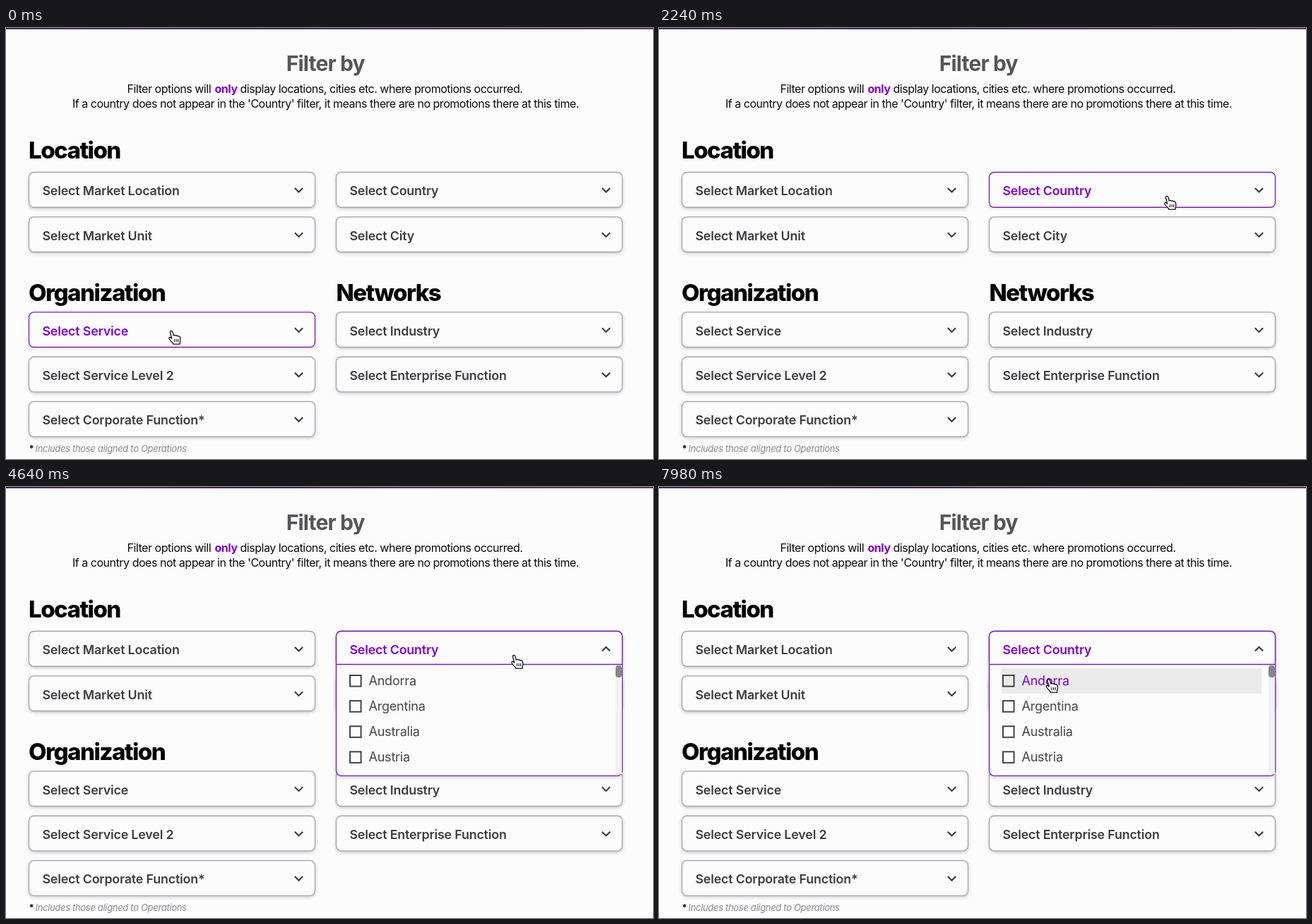
An HTML page with a canvas that plays this animation: 916x611 px, repeating every 8000 ms.

```html
<!DOCTYPE html>
<html lang="en">
<head>
<meta charset="utf-8">
<title>Filter by</title>
<style>
  html, body { margin: 0; width: 100%; height: 100%; overflow: hidden; background: #fcfcfc; }
  canvas { display: block; width: 916px; height: 611px; }
</style>
</head>
<body>
<canvas id="stage" width="916" height="611"></canvas>
<script>
const ctx = document.getElementById('stage').getContext('2d');
const LOOP = 8000;
const OPEN_AT = 3740;
const FLIP_AT = 3800;
const ROW_HOVER_AT = 5365;
const FADE = 300;
const BOX_W = 405, BOX_H = 49.7;

const BG = [252, 252, 252];
const INK = [62, 60, 66];
const PURPLE = [128, 0, 208];
const EDGE = [166, 163, 176];
const EDGE_ON = [130, 26, 182];

const FONTS = {
  title: { font: '700 30px Inter, sans-serif', gap: -0.85 },
  heading: { font: '800 33px Inter, sans-serif', gap: -1.5 },
  body: { font: '400 16px Inter, sans-serif', gap: -0.475 },
  strong: { font: '700 16px Inter, sans-serif', gap: -0.45 },
  label: { font: '600 17.8px Inter, sans-serif', gap: -0.15 },
  option: { font: '400 18px Inter, sans-serif', gap: -0.22 },
  note: { font: 'italic 400 13px Inter, sans-serif', gap: -0.32 },
  star: { font: '700 13px Inter, sans-serif', gap: 0 }
};

// on/off: time span in which the pointer hovers over the box
const BOXES = [
  { x: 32.5, y: 204.5, label: 'Select Market Location' },
  { x: 32.5, y: 267.8, label: 'Select Market Unit' },
  { x: 467.5, y: 267.8, label: 'Select City', on: 1577, off: 1807 },
  { x: 32.5, y: 402.8, label: 'Select Service', on: -1000, off: 1168 },
  { x: 32.5, y: 466.2, label: 'Select Service Level 2' },
  { x: 32.5, y: 529.6, label: 'Select Corporate Function*' },
  { x: 467.5, y: 402.8, label: 'Select Industry' },
  { x: 467.5, y: 466.2, label: 'Select Enterprise Function' },
  { x: 467.5, y: 204.5, label: 'Select Country', on: 1897, off: Infinity, opens: true }
];
const OPTIONS = ['Andorra', 'Argentina', 'Australia', 'Austria'];

const easeIn = u => Math.pow(u, 1.5);
const easeOut = u => 1 - (1 - u) * (1 - u);
const PATH = [
  { t: 900, x: 235.5, y: 430 },
  { t: 1660, x: 690, y: 297, ease: easeIn },
  { t: 2150, x: 720.5, y: 239, ease: easeOut },
  { t: 5100, x: 720.5, y: 239, ease: easeOut },
  { t: 5440, x: 618.5, y: 265, ease: easeIn },
  { t: 5900, x: 553, y: 273, ease: easeOut }
];

const HAND = new Path2D('M-3 2Q-3.5-.8-1-.5Q.3-.2 .8 2L1.8 6Q4 4.6 5 6.4Q7 5.2 8 7.2' +
  'Q10.8 6.2 11 9Q12 13 10.6 15.5V18.2H1.2L.8 16.8Q-1.5 15-4.2 11Q-5.4 8.4-3.2 8.4Q-2.2 8.6-.8 10Z');
const KNUCKLES = new Path2D('M3 11V15M5.6 11V15M8.2 11V15');

const clamp = v => Math.max(0, Math.min(1, v));
const rgb = c => `rgb(${c.map(Math.round).join(',')})`;
const mix = (a, b, k) => rgb(a.map((v, i) => v + (b[i] - v) * k));

function text(str, x, y, style, color, align = 'left') {
  ctx.font = FONTS[style].font;
  ctx.letterSpacing = FONTS[style].gap + 'px';
  ctx.textAlign = align;
  ctx.fillStyle = color;
  ctx.fillText(str, x, y);
}

function panel(x, y, w, h, edge, depth) {
  ctx.beginPath();
  ctx.roundRect(x, y, w, h, 7);
  ctx.save();
  ctx.shadowColor = `rgba(60,55,80,${depth})`;
  ctx.shadowBlur = 5;
  ctx.shadowOffsetY = 2;
  ctx.fillStyle = rgb(BG);
  ctx.fill();
  ctx.restore();
  ctx.strokeStyle = edge;
  ctx.lineWidth = 1.35;
  ctx.stroke();
}

function chevron(x, y, angle) {
  ctx.save();
  ctx.translate(x, y);
  ctx.rotate(angle);
  ctx.beginPath();
  ctx.moveTo(-5.7, -2.8);
  ctx.lineTo(0, 2.8);
  ctx.lineTo(5.7, -2.8);
  ctx.strokeStyle = '#39373d';
  ctx.lineWidth = 2.1;
  ctx.stroke();
  ctx.restore();
}

function drawBox(box, t) {
  const { x, y, on = Infinity, off = Infinity } = box;
  const glow = clamp((t - on) / FADE) * (1 - clamp((t - off) / FADE));
  const hovered = t >= on && t < off;
  const open = box.opens && t >= OPEN_AT;
  panel(x, y, BOX_W, BOX_H, mix(EDGE, EDGE_ON, glow), 0.3 - 0.2 * glow);
  if (open) drawList(x, y, t);
  text(box.label, x + 18.9, y + 32.8, 'label', rgb(hovered ? PURPLE : INK));
  const turn = box.opens ? clamp((t - FLIP_AT) / 200) * Math.PI : 0;
  chevron(x + 382, y + 25.3, turn);
}

function drawList(x, y, t) {
  const top = y + 47, bottom = y + 204.8;
  panel(x, y, BOX_W, bottom - y, rgb(EDGE_ON), 0.3);

  ctx.fillStyle = '#f2f1f3';
  ctx.fillRect(863, top, 9, bottom - top - 2);
  ctx.fillStyle = '#858488';
  ctx.beginPath();
  ctx.roundRect(863, top + 1.5, 8.8, 17, 4);
  ctx.fill();

  ctx.strokeStyle = rgb(EDGE_ON);
  ctx.lineWidth = 1.35;
  ctx.beginPath();
  ctx.moveTo(x, top);
  ctx.lineTo(x + BOX_W, top);
  ctx.stroke();

  const hover = clamp((t - ROW_HOVER_AT) / FADE);
  ctx.fillStyle = mix(BG, [235, 235, 236], hover);
  ctx.fillRect(485, 257, 368, 36);
  OPTIONS.forEach((name, i) => {
    const cy = 274.8 + i * 36.1;
    ctx.strokeStyle = '#454349';
    ctx.lineWidth = 2;
    ctx.strokeRect(487, cy - 7.8, 15.6, 15.6);
    text(name, 513.5, cy + 5.7, 'option', mix([70, 68, 75], PURPLE, i ? 0 : clamp(hover * 1.6)));
  });
}

function drawPage() {
  ctx.fillStyle = rgb(BG);
  ctx.fillRect(0, 0, 916, 611);
  const strip = ctx.createLinearGradient(0, 0, 916, 0);
  ['#2a1140', '#351048', '#260d3a', '#3c1450', '#461a3c', '#521f40']
    .forEach((c, i) => strip.addColorStop(i / 5, c));
  ctx.fillStyle = strip;
  ctx.fillRect(0, 0, 916, 1.7);

  text('Filter by', 396.8, 60.5, 'title', '#565558');
  text('Filter options will ', 171.5, 92, 'body', '#0b0a0c');
  text('only', 295.5, 92, 'strong', rgb(PURPLE));
  text('display locations, cities etc. where promotions occurred.', 331.5, 92, 'body', '#0b0a0c');
  text("If a country does not appear in the 'Country' filter, it means there are no promotions there at this time.",
    452.5, 113, 'body', '#0b0a0c', 'center');

  text('Location', 32, 184.8, 'heading', '#000');
  text('Organization', 32, 387.2, 'heading', '#000');
  text('Networks', 467.5, 387.2, 'heading', '#000');
  text('*', 32.5, 601, 'star', '#111');
  text('Includes those aligned to Operations', 41.5, 600.5, 'note', '#8a898d');
}

function pointer(t) {
  const i = PATH.findIndex(p => p.t > t);
  if (i < 0) return PATH[PATH.length - 1];
  if (i === 0) return PATH[0];
  const a = PATH[i - 1], b = PATH[i];
  const k = b.ease((t - a.t) / (b.t - a.t));
  return { x: a.x + (b.x - a.x) * k, y: a.y + (b.y - a.y) * k };
}

function drawHand({ x, y }) {
  ctx.save();
  ctx.translate(x, y);
  ctx.lineJoin = 'round';
  ctx.fillStyle = '#fff';
  ctx.strokeStyle = '#111';
  ctx.lineWidth = 1.3;
  ctx.fill(HAND);
  ctx.stroke(HAND);
  ctx.lineWidth = 1.1;
  ctx.stroke(KNUCKLES);
  ctx.restore();
}

const start = performance.now();
function frame() {
  const t = (performance.now() - start) % LOOP;
  drawPage();
  BOXES.forEach(box => drawBox(box, t));
  drawHand(pointer(t));
  requestAnimationFrame(frame);
}
frame();
</script>
</body>
</html>
```
